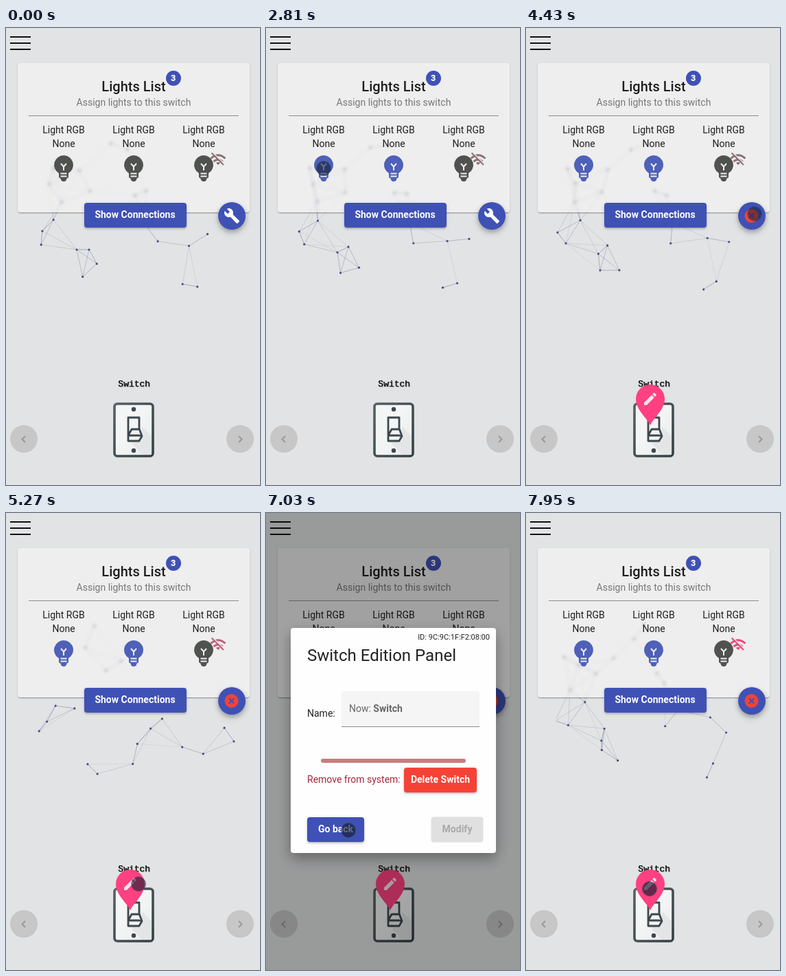
Write an HTML page with a canvas that moves like this. It is 370 px wide and 664 px high and loops after 7.99 s.

```html
<!DOCTYPE html>
<html lang="en">
<head>
<meta charset="utf-8">
<title>Lights List</title>
<style>
  html, body { margin: 0; width: 100%; height: 100%; overflow: hidden; background: #e2e3e4; }
  #stage { position: relative; width: 370px; height: 664px; overflow: hidden; background: #e2e3e4; }
  canvas, svg { position: absolute; left: 0; top: 0; }
  #card {
    position: absolute; left: 17px; top: 51px; width: 338px; height: 217px; border-radius: 4px;
    background: rgba(255,253,250,.43); backdrop-filter: blur(2px);
    box-shadow: 0 2px 1px -1px rgba(0,0,0,.2), 0 1px 1px rgba(0,0,0,.14), 0 1px 3px rgba(0,0,0,.12);
  }
  svg { font: 14px Roboto, sans-serif; }
  .mid { text-anchor: middle; }
  .bold { font-weight: 700; }
  .white { fill: #fff; }
  .blue { fill: #3f51b5; }
  .raised { filter: drop-shadow(0 2px 1px rgba(0,0,0,.16)) drop-shadow(0 1px 2px rgba(0,0,0,.12)); }
  .fab { filter: drop-shadow(0 3px 3px rgba(0,0,0,.2)) drop-shadow(0 4px 5px rgba(0,0,0,.16)); }
  .line { fill: none; stroke-linecap: round; stroke-linejoin: round; }
  .typed { font: 13px 'Liberation Mono', monospace; text-shadow: .5px 0 #333, 1px 1px 1px #999; }
</style>
</head>
<body>
<div id="stage">
  <canvas id="net" width="370" height="664"></canvas>
  <div id="card"></div>
  <svg width="370" height="664" viewBox="0 0 370 664">
    <defs>
      <linearGradient id="plate" x2="1" y2="1">
        <stop offset=".4" stop-color="#f4f5f5"/><stop offset="1" stop-color="#ebeced"/>
      </linearGradient>
      <linearGradient id="frame" x2="1" y2="1">
        <stop stop-color="#566166"/><stop offset="1" stop-color="#353f44"/>
      </linearGradient>
      <g id="bulb">
        <path d="M0-14A14 14 0 0 1 7 12.100V17Q7 19 4.500 19.500Q4 24 0 24T-4.500 19.500Q-7 19-7 17V12.100A14 14 0 0 1 0-14Z"/>
        <path fill="none" stroke="#eee" stroke-width="2" d="M-4-2L0 2.500L4-2M0 2V8M-4.500 12.500H4.500M-4.500 16.500H4.500"/>
      </g>
    </defs>

    <path d="M6 13H36M6 22H36M6 31H36" stroke="#111" stroke-width="2"/>
    <text class="mid" x="186" y="92" font-size="20" font-weight="500" fill="#1d1d1d">Lights List</text>
    <circle class="blue" cx="244" cy="73" r="11"/>
    <text class="mid white" x="243.500" y="77.300" font-size="12.500" font-weight="900">3</text>
    <text class="mid" x="186" y="113" fill="#777">Assign lights to this switch</text>
    <path d="M33 127.500H339" stroke="#8c8c8c"/>
    <g id="lights" class="mid" fill="#1f1f1f"></g>
    <g id="wifi" fill="none" stroke-width="3">
      <path d="M298.500 189.500Q309 180 319.500 189.500M302.500 194Q309 188.500 315.500 194"/>
      <path d="M306 196Q309 193.500 312 196L309 199Z" fill="currentColor" stroke="none"/>
      <path d="M301.500 181.500L318.500 197.500" stroke="#ececec" stroke-width="1.500"/>
      <path d="M299.500 181.500L317 199" stroke-width="2"/>
    </g>

    <rect class="blue raised" x="114" y="254" width="149" height="36" rx="4"/>
    <text class="mid bold white" x="188" y="276">Show Connections</text>
    <circle class="blue fab" cx="329" cy="273" r="20"/>
    <path id="wrench" class="white" transform="translate(317 261)" d="M22.700 19l-9.100-9.100c.9-2.300.4-5-1.500-6.900-2-2-5-2.400-7.400-1.300L9 6 6 9 1.600 4.700C.4 7.100.9 10.100 2.900 12.100c1.900 1.900 4.600 2.400 6.900 1.500l9.100 9.100c.4.4 1 .4 1.400 0l2.300-2.300c.5-.4.5-1.100.1-1.400z"/>
    <g id="cancel">
      <circle cx="328.500" cy="273" r="10" fill="#f44336"/>
      <path d="M324.800 269.300L332.200 276.700M332.200 269.300L324.800 276.700" stroke="#3f51b5" stroke-width="2"/>
    </g>

    <text class="mid typed" x="186.500" y="521" fill="#111">Switch</text>
    <rect x="158" y="546" width="56" height="76" rx="4" fill="url(#plate)" stroke="url(#frame)" stroke-width="3.600"/>
    <path d="M198 579L212 593V620H198L181 601H198Z" fill="#e3e5e6"/>
    <path class="line" stroke="#3d484d" stroke-width="2.800" d="M178 566H194V582L198 593L194 600H178ZM178 592L183 583H194M178 592H194L198 593"/>
    <g fill="#3d484d">
      <circle cx="186" cy="554" r="3.200"/><circle cx="186" cy="614" r="3.200"/>
    </g>
    <g fill="#c7c7c8">
      <circle cx="26" cy="597" r="20"/><circle cx="341" cy="597" r="20"/>
      <path d="M28 593L23.500 597.500L28 602M339 593L343.500 597.500L339 602" fill="none" stroke="#999" stroke-width="2"/>
    </g>
    <g id="pin">
      <path fill="#ff4081" d="M181 577.500C177 567 160 555 160 539a21 21 0 0 1 42 0C202 555 185 567 181 577.500Z"/>
      <path fill="#fbe3eb" transform="translate(169 527)" d="M3 17.250V21h3.750L17.810 9.940l-3.750-3.750L3 17.250zM20.710 7.040c.39-.39.39-1.020 0-1.410l-2.340-2.340c-.39-.39-1.020-.39-1.410 0l-1.830 1.830 3.750 3.750 1.830-1.830z"/>
    </g>

    <rect id="shade" width="370" height="664"/>
    <g id="dialog" fill="#222">
      <rect x="36" y="167" width="299" height="327" rx="4" fill="#fefefe" style="filter:drop-shadow(0 8px 10px rgba(0,0,0,.35))"/>
      <text x="326" y="184" font-size="11" text-anchor="end">ID: 9C:9C:1F:F2:08:00</text>
      <text x="60" y="215" font-size="24">Switch Edition Panel</text>
      <text x="60" y="296">Name:</text>
      <path d="M110 311V263q0-4 4-4H307q4 0 4 4V311Z" fill="#f5f5f5"/>
      <path d="M110 310.500H311" stroke="#8c8c8c"/>
      <text x="121" y="289" fill="#666">Now: <tspan class="bold">Switch</tspan></text>
      <rect x="80" y="357" width="211" height="6" rx="3" fill="#c97c7e"/>
      <text x="60" y="392" fill="#a5263a">Remove from system:</text>
      <rect class="raised" x="201" y="370" width="106" height="36" rx="4" fill="#f44336"/>
      <text class="mid bold white" x="254" y="392">Delete Switch</text>
      <rect class="blue raised" x="60" y="442" width="83" height="36" rx="4"/>
      <text class="mid bold white" x="101.500" y="464">Go back</text>
      <rect x="240.500" y="441.500" width="76" height="37" rx="4" fill="#e0e0e0"/>
      <text class="mid bold" x="278.500" y="464" fill="#a9a9a9">Modify</text>
    </g>
    <circle id="touch" r="10.500" fill="#121c30" stroke="#24405a"/>
  </svg>
</div>
<script>
const LOOP = 7990;
const $ = id => document.getElementById(id);
const ramp = (t, a, b) => Math.max(0, Math.min(1, (t - a) / (b - a)));
const smooth = v => v * v * (3 - 2 * v);
const mix = (a, b, k) => a + (b - a) * k;
const show = (el, v) => { el.style.opacity = v; };
const scaleAbout = (el, x, y, s) =>
  el.setAttribute('transform', `translate(${x} ${y}) scale(${s}) translate(${-x} ${-y})`);

$('lights').innerHTML = [84, 186, 288].map(x =>
  `<text x="${x}" y="153">Light RGB</text><text x="${x}" y="173">None</text>
   <use href="#bulb" x="${x}" y="199"/>`).join('');
const bulbs = document.querySelectorAll('#lights use');

// Each hub carries two nodes that turn slowly around it
const calm = [
  [112, 322], [122, 352], [52, 305], [212, 298], [268, 374], [280, 308],
  [66, 215], [115, 222], [165, 172], [196, 240], [75, 266]
];
const shaken = [
  [54, 310], [86, 282], [126, 372], [188, 350], [219, 306], [272, 345],
  [325, 322], [122, 180], [157, 222]
];
const REACH = 66;
const ctx = $('net').getContext('2d');

function nodesAt(t) {
  const pressed = t >= 4900 && t < 7170;
  if (pressed && t > 5700) return [];
  return (pressed ? shaken : calm).flatMap(([x, y], i) => {
    const angle = 2.4 * i + (i % 2 ? 1 : -1) * t / 6000;
    const r = 9 + i * 5 % 9;
    const dx = r * Math.cos(angle), dy = r * Math.sin(angle);
    return [[x + dx, y + dy], [x - dx, y - dy]];
  });
}

function drawNet(nodes) {
  ctx.clearRect(0, 0, 370, 664);
  ctx.save();
  ctx.beginPath();
  ctx.rect(44, 100, 300, 300);
  ctx.clip();
  ctx.lineWidth = .7;
  nodes.forEach(([x, y], i) => {
    for (const [x2, y2] of nodes.slice(i + 1)) {
      const d = Math.hypot(x2 - x, y2 - y);
      if (d > REACH) continue;
      ctx.strokeStyle = `rgba(50,68,125,${.1 + .6 * (1 - d / REACH)})`;
      ctx.beginPath();
      ctx.moveTo(x, y);
      ctx.lineTo(x2, y2);
      ctx.stroke();
    }
    ctx.fillStyle = '#424e78';
    ctx.beginPath();
    ctx.arc(x, y, 1.6, 0, 7);
    ctx.fill();
  });
  ctx.restore();
}

// Glides of the touch point; each ends in a tap
const glides = [
  { from: 400, to: 1080, x: 171, y: 201 },
  { from: 1900, to: 2600, x: 84, y: 204 },
  { from: 3240, to: 4050, x: 333, y: 270 },
  { from: 4560, to: 5230, x: 193, y: 539 },
  { from: 5300, to: 5420, x: 184, y: 548 },
  { from: 6330, to: 6950, x: 120, y: 461 },
  { from: 7250, to: 7800, x: 180, y: 546 }
];

function touchAt(t) {
  let x = 322, y = 535, press = 0;
  for (const g of glides) {
    const k = smooth(ramp(t, g.from, g.to));
    x = mix(x, g.x, k);
    y = mix(y, g.y, k);
    press = Math.max(press, 1 - Math.abs(t - g.to - 120) / 150);
  }
  return { x, y, press };
}

function render(t) {
  drawNet(nodesAt(t));

  const litFrom = [2740, 1660, Infinity];
  bulbs.forEach((b, i) => { b.style.fill = t < litFrom[i] ? '#505250' : '#4e60b8'; });
  const wifi = t < 4900 ? '#8a7075' : t < 7170 ? '#bd6079' : '#e8487a';
  $('wifi').style.stroke = $('wifi').style.color = wifi;

  const editing = t >= 4150;
  show($('wrench'), editing ? 0 : 1);
  show($('cancel'), editing ? 1 : 0);
  scaleAbout($('pin'), 181, 577, smooth(ramp(t, 4150, 4350)));

  const opened = smooth(ramp(t, 5460, 5640));
  show($('shade'), .32 * ramp(t, 5440, 5840) * (1 - ramp(t, 7180, 7560)));
  show($('dialog'), opened * (1 - ramp(t, 7180, 7280)));
  scaleAbout($('dialog'), 185.5, 330.5, mix(.7, 1, opened));

  const { x, y, press } = touchAt(t);
  $('touch').setAttribute('cx', x);
  $('touch').setAttribute('cy', y);
  show($('touch'), ramp(t, 300, 420) * mix(.5, .7, press));
}

function tick() {
  render(performance.now() % LOOP);
  requestAnimationFrame(tick);
}
tick();
</script>
</body>
</html>
```
